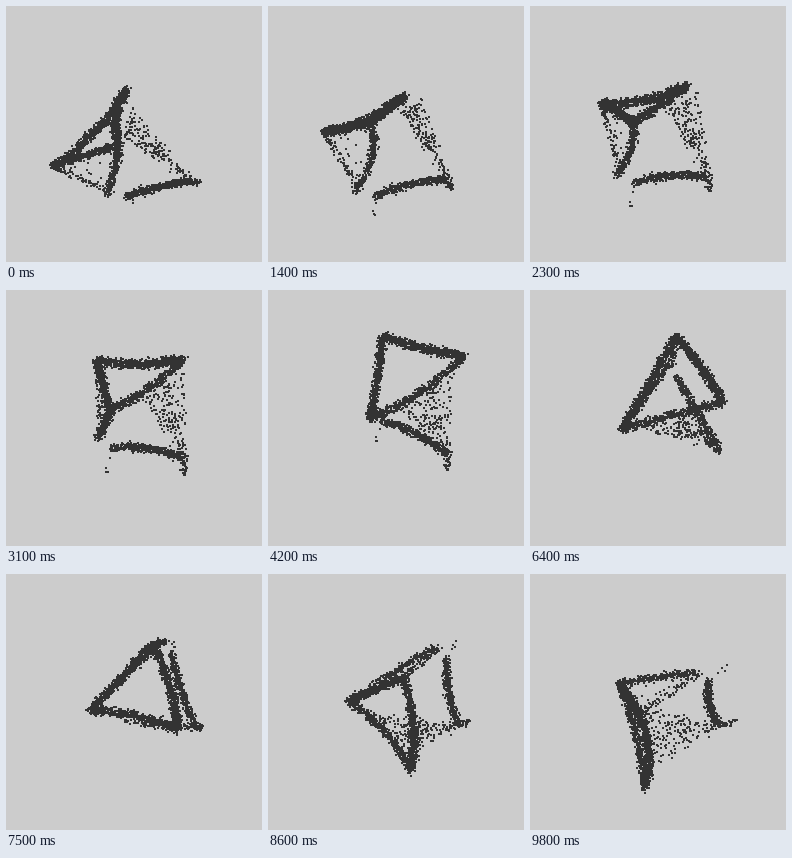
An HTML page with a canvas for the animation above (10000 ms loop, 256 by 256 pixels).

```html
<!DOCTYPE html>
<html lang="en">
<head>
<meta charset="utf-8">
<title>Point cloud tour</title>
<style>
  html, body { margin: 0; width: 100%; height: 100%; overflow: hidden; background: #ccc; }
  canvas { display: block; width: 100vw; height: 100vh; image-rendering: pixelated; }
</style>
</head>
<body>
<canvas id="stage" width="256" height="256"></canvas>
<script>
const ctx = document.getElementById('stage').getContext('2d');
const LOOP = 10000;

// Each main corner follows one smooth quartic path through five key points
const keySteps = [0, 13, 39, 79, 90];
const paths = {
  P: [[47, 160], [56, 126], [115, 46], [135, 104], [109, 140]],
  Q: [[121, 84], [137, 91], [196, 66], [143, 196], [115, 213]],
  M: [[112, 139], [103, 117], [103, 128], [81, 127], [90, 109]],
  R: [[101, 187], [87, 184], [104, 118], [168, 72], [167, 98]],
  B: [[120, 191], [107, 191], [114, 131], [179, 84], [179, 107]],
  D: [[122, 117], [143, 100], [158, 104], [125, 159], [122, 161]]
};

let seed = 7;
function rnd() {
  seed = (seed * 16807) % 2147483647;
  return seed / 2147483647;
}
const gauss = () => (rnd() + rnd() + rnd() + rnd() - 2) * 1.73;
const mix = (a, b, u) => [a[0] + (b[0] - a[0]) * u, a[1] + (b[1] - a[1]) * u];
const add = (a, x, y) => [a[0] + x, a[1] + y];
// Cosine that peaks at a step and reaches its trough half a turn later
const wave = (s, peak, half) => Math.cos((s - peak) * Math.PI / half);

// Polynomial (Lagrange) weights of the key points at step s
function weights(s) {
  return keySteps.map(a => keySteps.reduce(
    (w, b) => b === a ? w : w * (s - b) / (a - b), 1));
}

function pose(s) {
  const p = {}, w = weights(s);
  for (const name in paths) {
    p[name] = paths[name].reduce(
      (sum, key, i) => add(sum, key[0] * w[i], key[1] * w[i]), [0, 0]);
  }
  const swing = ((s - 38) / 52) ** 2;
  p.E = [184.5 - 6.5 * wave(s, 27, 52), 163 + 12 * wave(s, 0, 85)];
  p.T = add(p.E, 18 * swing, 8.5 + 11.5 * wave(s, 33, 52));
  p.W = add(p.B, 26 * swing - 7, 4 + 22 * wave(s, 28, 55));
  p.X = mix(p.R, p.B, 0.25);

  // Sideways bow of the curved edges, in pixels
  p.PQ = 6.5 * wave(s, 8, 80);
  p.MQ = 6 * wave(s, 38, 40);
  p.MR = -9 * Math.exp(-(((s - 14) / 12) ** 2));
  p.BE = -5 * wave(s, 25, 65);
  return p;
}

function bowed(a, b, bow, u) {
  const dx = b[0] - a[0], dy = b[1] - a[1];
  const k = 4 * u * (1 - u) * bow / (Math.hypot(dx, dy) || 1);
  return [a[0] + dx * u - dy * k, a[1] + dy * u + dx * k];
}

const dots = [];
function scatter(count, spread, makePlace) {
  for (let i = 0; i < count; i++) {
    dots.push({ place: makePlace(), jx: gauss() * spread, jy: gauss() * spread });
  }
}
function edge(a, b, count, spread) {
  scatter(count, spread, () => {
    const u = rnd();
    return p => bowed(p[a], p[b], p[a + b] || 0, u);
  });
}

edge('P', 'Q', 640, 2.2);
edge('P', 'M', 480, 2);
edge('M', 'Q', 540, 2.1);
edge('M', 'R', 330, 1.9);
edge('B', 'E', 400, 2);
edge('P', 'X', 70, 1.6);
edge('E', 'T', 26, 1.8);
edge('B', 'W', 5, 1.5);
// Loose dots inside the triangle P, M, X
scatter(22, 1.5, () => {
  const u = rnd(), v = Math.sqrt(rnd());
  return p => mix(p.P, mix(p.M, p.X, u), v);
});
// Thin sheet from the middle of edge MQ towards E
scatter(180, 2.4, () => {
  const w = (rnd() - 0.5) * 0.55, u = Math.pow(rnd(), 1.5);
  return p => mix(
    add(p.D, (p.Q[0] - p.M[0]) * w, (p.Q[1] - p.M[1]) * w), p.E, u);
});

function draw(s) {
  const p = pose(s);
  ctx.fillStyle = '#ccc';
  ctx.fillRect(0, 0, 256, 256);
  ctx.fillStyle = '#333';
  for (const d of dots) {
    const [x, y] = d.place(p);
    ctx.fillRect(Math.round(x + d.jx - 1), Math.round(y + d.jy - 1), 2, 2);
  }
}

let shown = -1;
function tick() {
  const k = Math.floor((performance.now() % LOOP) / 100);
  const step = k - Math.floor(k / 11); // each tenth step rests one beat longer
  if (step !== shown) draw(shown = step);
  requestAnimationFrame(tick);
}
tick();
</script>
</body>
</html>
```
